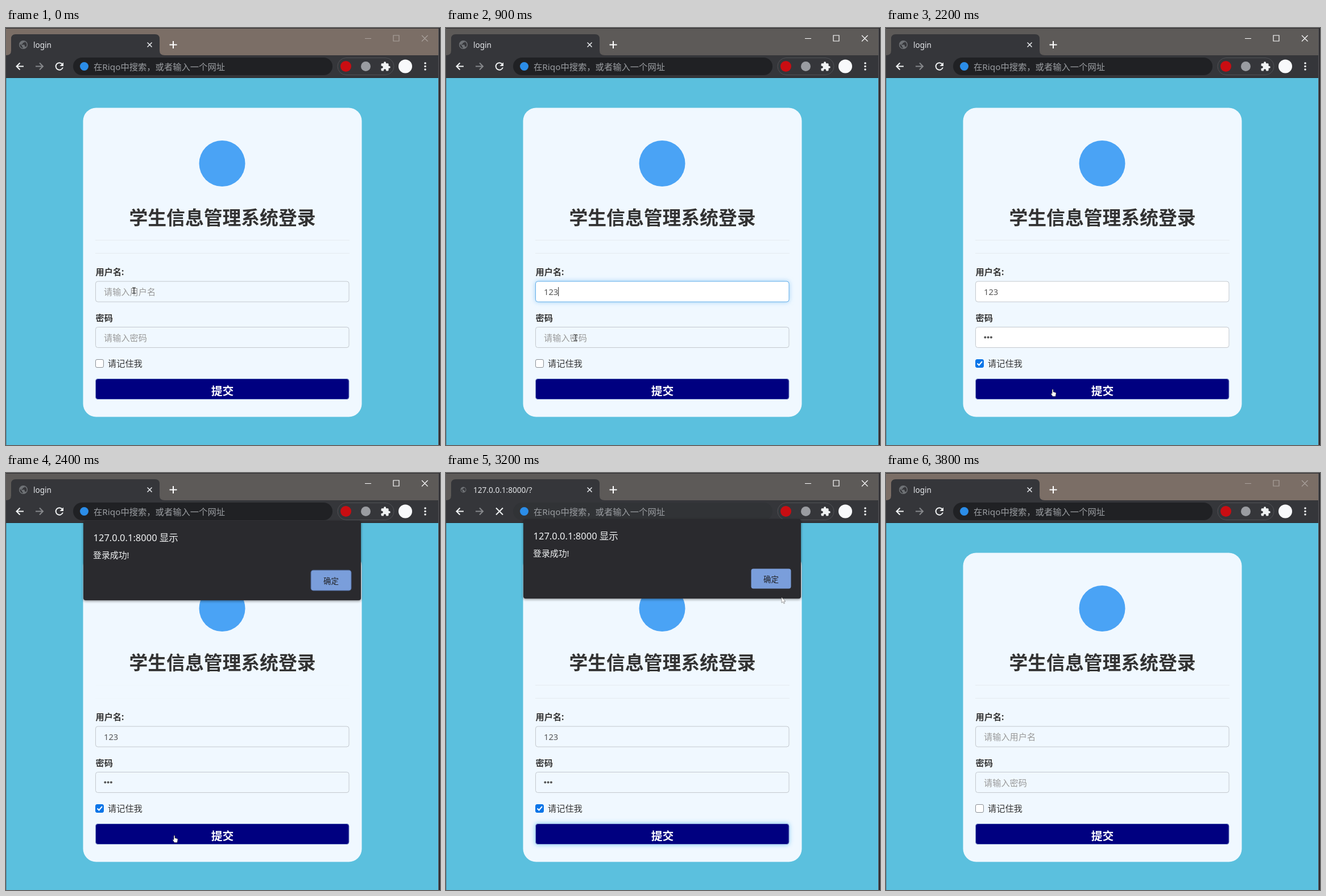
Write an HTML page that moves like this. It is 763x734 px and loops after 3900 ms.

```html
<!DOCTYPE html>
<html lang="zh-CN">
<head>
<meta charset="utf-8">
<title>login</title>
<style>
html, body { margin: 0; width: 100%; height: 100%; overflow: hidden; background: #5bc0de; }
svg { display: block; width: 763px; height: 734px; }
text { font-family: "Noto Sans", "Noto Sans CJK SC", "Noto Sans CJK", sans-serif; white-space: pre; }
.b { font-weight: 700; }
.mid { text-anchor: middle; }
.ln { fill: none; stroke-width: 2; }
</style>
</head>
<body>
<svg viewBox="0 0 763 734" xmlns="http://www.w3.org/2000/svg">
  <defs>
    <filter id="blur" x="-10%" y="-80%" width="120%" height="260%"><feGaussianBlur stdDeviation="4"/></filter>
    <filter id="shade" x="-10%" y="-10%" width="120%" height="130%"><feDropShadow dx="0" dy="1.500" stdDeviation="2" flood-opacity=".45"/></filter>
  </defs>

  <!-- window frame and tab -->
  <rect width="763" height="734" fill="#2d2c30"/>
  <rect id="bar" y="1" width="760" height="47"/>
  <path d="M0 48Q9 48 9 40V19Q9 11 17 11H262Q270 11 270 19V40Q270 48 279 48Z" fill="#35363a"/>
  <rect y="48" width="760" height="40" fill="#35363a"/>
  <g id="globe" fill="#6f7276"><path d="M12 2C6.48 2 2 6.48 2 12s4.48 10 10 10 10-4.48 10-10S17.52 2 12 2zm-1 17.93c-3.95-.49-7-3.85-7-7.93 0-.62.08-1.21.21-1.79L9 15v1c0 1.1.9 2 2 2v1.93zm6.9-2.54c-.26-.81-1-1.39-1.9-1.39h-1v-3c0-.55-.45-1-1-1H8v-2h2c.55 0 1-.45 1-1V7h2c1.1 0 2-.9 2-2v-.41c2.93 1.19 5 4.06 5 7.41 0 2.08-.8 3.97-2.1 5.39z" transform="translate(-12 -12)"/></g>
  <text id="tab" x="48" y="34.5" font-size="13.6" fill="#e4e6e9"></text>
  <path d="M248.500 25.500l8 8m0-8l-8 8" class="ln" stroke="#e0e2e5" style="stroke-width:1.6"/>
  <path d="M287.500 29.500h13m-6.500-6.500v13" class="ln" stroke="#fff"/>
  <path id="controls" d="M631 18.500h11M681 13h10v10h-10zM731 13l10.500 10.500m0-10.500L731 23.500" fill="none" stroke-width="1.2"/>

  <!-- toolbar -->
  <path d="M31 67.500H18.500m6-6l-6 6 6 6" class="ln" stroke="#f1f3f4"/>
  <path d="M52 67.500h13m-6-6l6 6-6 6" class="ln" stroke="#86888b"/>
  <g id="reload"><path d="M98.700 63.300A6.300 6.300 0 1 0 99.900 69.500" class="ln" stroke="#f1f3f4"/><path d="M101 60.500v6.500h-6.500z" fill="#f1f3f4"/></g>
  <path id="stop" d="M88 61.500l12 12m0-12l-12 12" class="ln" stroke="#f1f3f4"/>
  <rect id="pill" x="118" y="52" width="456" height="31" rx="15.500" fill="#202124"/>
  <circle cx="137.500" cy="67.500" r="7.500" fill="#2b8de8"/>
  <text x="154" y="73.500" font-size="15.3" fill="#9a9da1">在Riqo中搜索，或者输入一个网址</text>
  <rect x="583" y="52.500" width="99" height="30" rx="15" fill="none" stroke="#505256"/>
  <circle cx="597.500" cy="67.500" r="9.500" fill="#c90d12"/>
  <circle cx="632.500" cy="67.500" r="8.500" fill="#9a9ca1"/>
  <path d="M20.500 11H19V7c0-1.100-.9-2-2-2h-4V3.500C13 2.120 11.880 1 10.500 1S8 2.120 8 3.500V5H4c-1.100 0-1.990.9-1.990 2v3.800H3.500c1.490 0 2.700 1.210 2.700 2.700s-1.210 2.700-2.700 2.700H2V20c0 1.100.9 2 2 2h3.800v-1.500c0-1.490 1.210-2.700 2.700-2.700 1.490 0 2.700 1.210 2.700 2.700V22H17c1.100 0 2-.9 2-2v-4h1.500c1.380 0 2.500-1.120 2.500-2.500S21.880 11 20.500 11z" transform="translate(658 58.500) scale(.77)" fill="#f1f3f4"/>
  <circle cx="702" cy="67.500" r="12" fill="#f8f9fb"/>
  <g fill="#f1f3f4"><circle cx="737" cy="62" r="1.800"/><circle cx="737" cy="67.500" r="1.800"/><circle cx="737" cy="73" r="1.800"/></g>

  <!-- page -->
  <rect y="88" width="760" height="646" fill="#5bc0de"/>
  <rect y="87" width="760" height="1" fill="#292a2d"/>
  <path d="M.5 88V734" stroke="#4c8ca3"/>
  <path d="M760.500 1V734" stroke="#59595d"/>
  <rect x="135.500" y="140.500" width="490" height="544" rx="23" fill="#f0f8ff"/>
  <circle cx="380" cy="238.500" r="40.500" fill="#4aa3f5"/>
  <text x="380.500" y="346" font-size="32.8" fill="#333" class="b mid">学生信息管理系统登录</text>
  <path id="rules" d="M157 373.500H604M157 396.500H604" stroke="#e5ebf0"/>
  <g font-size="15.2" fill="#333">
    <text x="157.500" y="435" class="b">用户名:</text>
    <text x="157.500" y="515.500" class="b">密码</text>
    <text x="179" y="596">请记住我</text>
  </g>
  <g id="user"></g>
  <g id="pass"></g>
  <g id="dots" fill="#555"></g>
  <path id="caret" stroke="#222"/>
  <rect id="box" x="157.500" y="583.500" width="14" height="14" rx="2.500"/>
  <path id="tick" d="M160.500 590.500l3 3 5.500-6.500" class="ln" stroke="#fff"/>
  <rect id="glow" x="157" y="617" width="446" height="37" rx="4" fill="#55b7f2" opacity=".75" filter="url(#blur)"/>
  <rect x="157.500" y="617.500" width="445.500" height="36" rx="4" fill="#000080" stroke="#8ea3d4"/>
  <text x="380.500" y="645.500" font-size="19.8" fill="#fff" class="b mid">提交</text>

  <!-- alert -->
  <g id="alert">
    <rect x="136" y="84" width="488" height="140" rx="4" fill="#292a2d" filter="url(#shade)"/>
    <text x="153.500" y="120" font-size="16.500" fill="#f1f3f4">127.0.0.1:8000 显示</text>
    <text x="153" y="149.500" font-size="14.900" fill="#f1f3f4">登录成功!</text>
    <rect id="ring" x="535.500" y="170.500" width="72" height="37" rx="5" fill="#4a608c"/>
    <rect x="536.500" y="171.500" width="70" height="35" rx="4" fill="#7a9edb"/>
    <text x="571.500" y="195" font-size="13.400" fill="#202124" class="mid">确定</text>
  </g>

  <!-- pointers, each with its hot spot at the origin -->
  <g id="pointer">
    <path id="ibeam" d="M-3 -5H-.8L0 -4.500.8 -5H3M0 -4.500V4.500M-3 5H-.8L0 4.500.8 5H3" fill="none" stroke="#222" stroke-width="1.100"/>
    <path id="arrow" d="M0 0V9.500L2.300 7.500 4 11 5.500 10.300 4 7H7Z" fill="#fff" stroke="#777" stroke-width=".7"/>
    <path id="hand" d="M-1 -5.500Q0 -6.800 1 -5.500V-1.500L5 -.5Q6 0 6 1.500L5 6.500H0L-3 2Q-3 .5 -1 1.500Z" fill="#fff" stroke="#222" stroke-width=".6"/>
  </g>
</svg>
<script>
const LOOP = 3900, STEP = 100;
const $ = id => document.getElementById(id);
const show = (id, on) => { $(id).style.display = on ? '' : 'none'; };
const set = (id, attrs) => { for (const k in attrs) $(id).setAttribute(k, attrs[k]); };
const within = (t, a, b) => t >= a && t < b;

// time, x, y
const path = [
  [0, 225, 462], [300, 225, 461], [700, 225, 461], [900, 228, 545], [1300, 228, 545],
  [1500, 250, 594], [1700, 164, 590], [1800, 164, 590], [2100, 292, 641], [2200, 293, 642],
  [2400, 296, 644], [2500, 296, 644], [2900, 575, 192], [3000, 575, 192], [3200, 590, 219], [3600, 640, 300]
];

function pointerAt(t) {
  const i = path.findIndex(p => p[0] > t);
  if (i < 0) return path[path.length - 1].slice(1);
  const a = path[i - 1], b = path[i];
  const u = (t - a[0]) / (b[0] - a[0]), e = u * u * (3 - 2 * u);
  return [a[1] + (b[1] - a[1]) * e, a[2] + (b[2] - a[2]) * e];
}

function makeField(id, y) {
  const rect = `x="157.5" y="${y}" width="445.500" height="36" rx="4"`;
  $(id).innerHTML = `<rect ${rect} fill="#8fc9f5" filter="url(#blur)"/><rect ${rect}/>
    <text x="172" y="${y + 24}" font-size="15.200"></text>`;
}

function drawField(id, value, hint, focused, white) {
  const [halo, frame, label] = $(id).children;
  halo.style.display = focused ? '' : 'none';
  frame.setAttribute('fill', white ? '#fff' : '#f0f8ff');
  frame.setAttribute('stroke', focused ? '#66afe9' : '#c3c8ce');
  label.setAttribute('fill', value ? '#555' : '#999');
  label.setAttribute('font-size', value ? 14.7 : 15.2);
  label.textContent = value || hint;
}

function drawPointer(t, alert) {
  const [x, y] = pointerAt(t);
  const onForm = x > 157 && x < 603;
  const hand = onForm && within(y, 618, 654);
  const ibeam = onForm && !alert && (within(y, 446, 483) || within(y, 526, 563));
  show('pointer', t < 3700);
  show('hand', hand);
  show('ibeam', ibeam);
  show('arrow', !hand && !ibeam);
  set('pointer', { transform: `translate(${x} ${y})` });
}

function draw(t) {
  const active = within(t, 200, 3700);
  const loading = within(t, 3100, 3400);
  const reset = t >= 3400;
  const alert = within(t, 2400, 3300);
  const userFocus = within(t, 200, 1000), passFocus = within(t, 1000, 1800);
  const user = reset ? '' : '123'.slice(0, Math.max(0, (t - 400) / STEP));
  const typed = reset ? 0 : Math.min(3, Math.max(0, (t - 1000) / STEP));
  const checked = within(t, 1800, 3400);

  set('bar', { fill: active ? '#5d5a58' : '#7b6e66' });
  set('controls', { stroke: active ? '#fff' : '#aaa19c' });
  $('tab').textContent = loading ? '127.0.0.1:8000/?' : 'login';
  set('globe', { transform: `translate(30.5 29.500) scale(${loading ? .5 : .75})` });
  show('reload', !loading);
  show('stop', loading);
  set('pill', { opacity: within(t, 3200, 3300) ? .15 : 1 });
  set('rules', { opacity: within(t, 2400, 2500) ? .15 : 1 });

  drawField('user', user, '请输入用户名', userFocus, userFocus || user && t < 2400);
  drawField('pass', typed ? ' ' : '', '请输入密码', passFocus, passFocus || typed && t < 2400);
  [...$('dots').children].forEach((dot, i) => { dot.style.display = i < typed ? '' : 'none'; });

  const cx = userFocus ? 172 + user.length * 8.4 : 172 + typed * 5.3;
  show('caret', userFocus || within(t, 1000, 1500));
  set('caret', { d: `M${cx + .5} ${userFocus ? 456 : 537}v16` });

  set('box', { fill: checked ? '#0b75e8' : '#fff', stroke: checked ? '#0b75e8' : '#8b9096' });
  show('tick', checked);
  show('glow', within(t, 3000, 3400));

  show('alert', alert);
  show('ring', t < 3000);
  set('alert', { transform: `translate(0 ${t >= 3200 ? -3 : 0})` });
  drawPointer(t, alert);
}

makeField('user', 446);
makeField('pass', 526.5);
$('dots').innerHTML = [0, 1, 2].map(i => `<circle cx="${174.3 + i * 5.3}" cy="544.500" r="2"/>`).join('');

const start = performance.now();
function tick() {
  const t = (performance.now() - start) % LOOP;
  draw(Math.floor(t / STEP) * STEP);
  requestAnimationFrame(tick);
}
draw(0);
requestAnimationFrame(tick);
</script>
</body>
</html>
```
